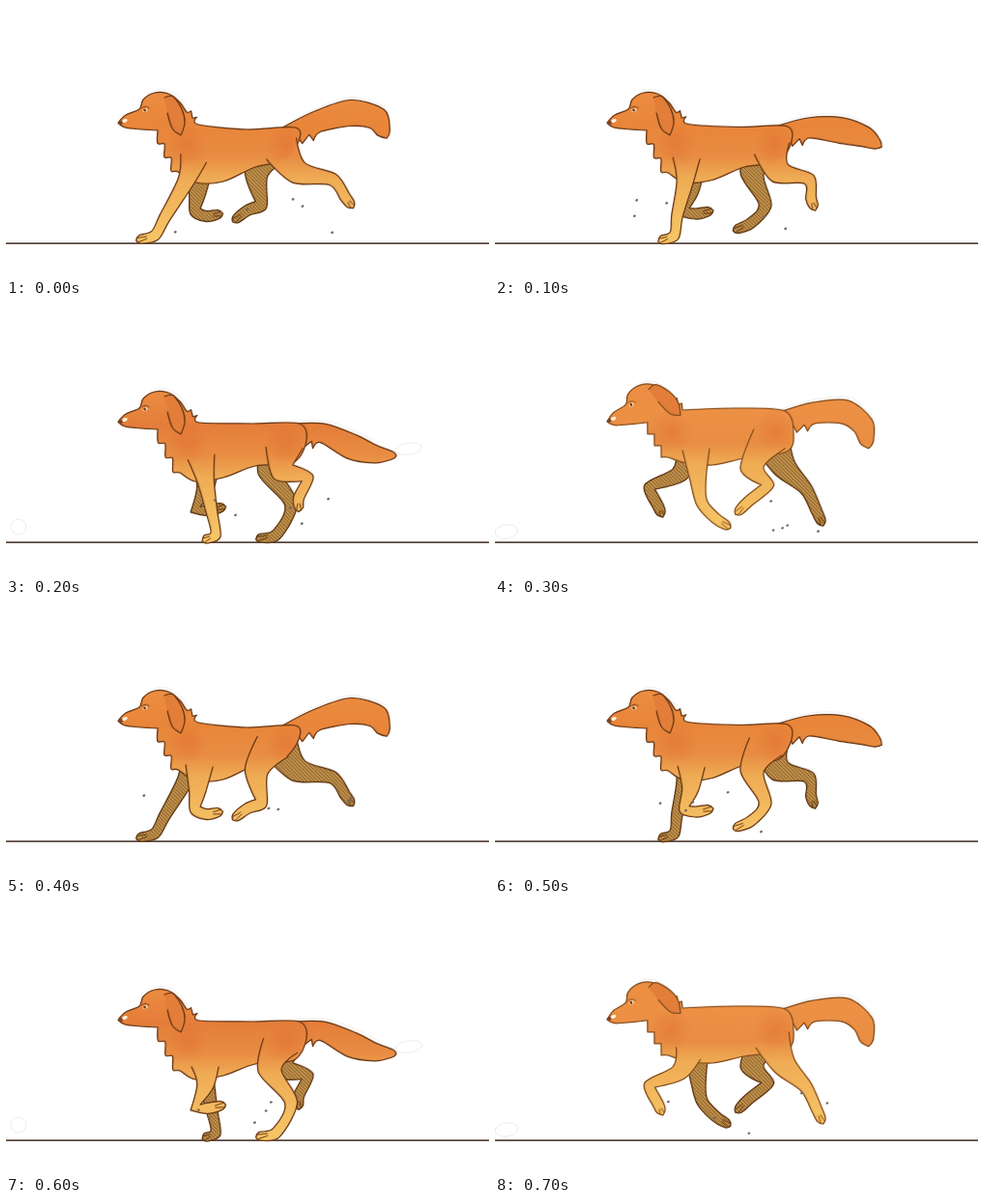
These frames come from a looping animation (500 px wide and 281 px high, 0.8 s). An HTML page with a canvas:

```html
<!DOCTYPE html>
<html lang="en">
<head>
<meta charset="utf-8">
<title>Running dog</title>
<style>
html, body { margin: 0; height: 100%; overflow: hidden; background: #fff }
canvas { display: block; width: 100vw; height: 100vh }
</style>
</head>
<body>
<canvas id="stage" width="500" height="281"></canvas>
<script>
const ctx = document.getElementById('stage').getContext('2d');
const STEP = 100, STEPS = 8;

// Half widths along each limb, root to tip.
const FRONT = [14, 8.5, 5.8, 5.5, 4.5], HIND = [19, 12, 6.5, 5.5, 4.5];

// The head is one shape, tilted about the nose; the ear also swings.
const NOSE = [116, 121], EAR_ROOT = [166, 95];
const HEAD = [NOSE, [124, 113], [138, 107], [142, 97], [154, 90], [168, 91], [180, 100], [187, 110]];
const JAW = [[157, 129], [140, 128], [123, 126]];
const EAR = [[164, 95], [173, 94], [182, 107], [185, 121], [181, 134], [172, 127], [167, 111]];

// Joints of three key poses; the torso runs from withers over rump to chest.
const contact = {
  torso: [[199, 123], [250, 128], [299, 126], [303, 140], [288, 160], [258, 167], [225, 182], [196, 183], [178, 172]],
  tail: [[288, 133], [322, 120], [357, 111], [384, 117], [391, 131]],
  tailWidth: [7, 11, 13.5, 12, 7],
  leadFront: [[194, 158], [186, 182], [164, 220], [154, 238], [139, 242]],
  tuckFront: [[200, 168], [198, 195], [196, 213], [207, 218], [220, 216]],
  leadHind: [[285, 148], [303, 173], [338, 180], [351, 198], [357, 206]],
  tuckHind: [[276, 148], [259, 174], [264, 206], [250, 212], [238, 221]],
  tilt: 0, swing: 0, top: '#e88539', ink: '#6c3916', marks: []
};
const passing = {
  torso: [[200, 122], [255, 123], [303, 123], [311, 140], [298, 163], [258, 167], [225, 179], [196, 183], [180, 174]],
  tail: [[298, 131], [328, 133], [358, 147], [383, 155], [400, 156]],
  tailWidth: [8, 10, 13, 9, 4],
  leadFront: [[202, 158], [207, 184], [213, 215], [217, 238], [207, 243]],
  tuckFront: [[206, 170], [206, 190], [196, 212], [208, 213], [223, 210]],
  leadHind: [[288, 148], [287, 173], [312, 180], [303, 200], [303, 210]],
  tuckHind: [[284, 148], [273, 174], [295, 207], [280, 238], [263, 242]],
  tilt: 0, swing: 0, top: '#e47d39', ink: '#6c3a18', marks: [[13, 230, 8, 8], [417, 149, 14, 6]]
};
const push = {
  torso: [[194, 109], [250, 107], [300, 110], [309, 133], [302, 152], [258, 159], [225, 166], [198, 164], [179, 158]],
  tail: [[296, 119], [330, 112], [362, 111], [381, 125], [385, 142]],
  tailWidth: [8, 11, 12.5, 11, 7],
  leadFront: [[208, 150], [210, 180], [214, 205], [228, 221], [240, 229]],
  tuckFront: [[200, 156], [190, 176], [160, 189], [169, 209], [172, 216]],
  leadHind: [[284, 139], [266, 169], [282, 187], [262, 204], [252, 214]],
  tuckHind: [[287, 142], [300, 169], [322, 191], [333, 214], [338, 225]],
  tilt: -.175, swing: -.3, top: '#ec9044', ink: '#87501f', marks: [[12, 235, 12, 7]]
};

const mix = (a, b, k = .5) => Array.isArray(a) ? a.map((v, i) => mix(v, b[i], k)) : a + (b - a) * k;
const down = { ...contact };
for (const key of ['torso', 'tail', 'tailWidth', 'leadFront', 'tuckFront', 'leadHind', 'tuckHind']) {
  down[key] = mix(contact[key], passing[key]);
}
const poses = [contact, down, passing, push];

const spin = (pts, [cx, cy], angle) => pts.map(([x, y]) => {
  const c = Math.cos(angle), s = Math.sin(angle);
  return [cx + (x - cx) * c - (y - cy) * s, cy + (x - cx) * s + (y - cy) * c];
});
const unit = (p, q) => {
  const d = Math.hypot(q[0] - p[0], q[1] - p[1]) || 1;
  return [(q[0] - p[0]) / d, (q[1] - p[1]) / d];
};

// Zigzag of n tufts from p to q.
function fluff(p, q, n, depth) {
  const [dx, dy] = unit(p, q), pts = [];
  for (let i = 0; i < n; i++) {
    const [x, y] = mix(p, q, (i + .25) / n);
    pts.push(mix(p, q, i / n), [x - dy * depth, y + dx * depth]);
  }
  return [...pts, q];
}

// Outline of a limb around its joints, open at the root.
function ribbon(joints, half, tufts) {
  const front = [], back = [], last = joints.length - 1;
  joints.forEach((p, i) => {
    const a = unit(joints[Math.max(0, i - 1)], p), b = unit(p, joints[Math.min(last, i + 1)]);
    const [dx, dy] = unit([0, 0], [a[0] + b[0], a[1] + b[1]]), w = half[i];
    front.push([p[0] - dy * w, p[1] + dx * w]);
    back.unshift([p[0] + dy * w, p[1] - dx * w]);
  });
  const dir = unit(joints[last - 1], joints[last]);
  const tip = joints[last].map((v, i) => v + dir[i] * half[last]);
  if (tufts) front.splice(0, 2, ...fluff(front[0], front[1], tufts, 7));
  return [...front, tip, ...back];
}

// Smooth curve through the points; sharp turns stay corners.
function curve(pts, closed) {
  const n = pts.length, path = new Path2D();
  const at = i => closed ? pts[(i + n) % n] : pts[Math.max(0, Math.min(n - 1, i))];
  const slope = i => {
    const a = at(i - 1), b = at(i), c = at(i + 1), u = unit(a, b), v = unit(b, c);
    const sharp = u[0] * v[0] + u[1] * v[1] < .1;
    return sharp ? [0, 0] : [(c[0] - a[0]) / 6.5, (c[1] - a[1]) / 6.5];
  };
  path.moveTo(...pts[0]);
  for (let i = 0; i < (closed ? n : n - 1); i++) {
    const p = at(i), q = at(i + 1), s = slope(i), e = slope(i + 1);
    path.bezierCurveTo(p[0] + s[0], p[1] + s[1], q[0] - e[0], q[1] - e[1], ...q);
  }
  if (closed) path.closePath();
  return path;
}

function ink(path, color, width = 1.2) {
  ctx.strokeStyle = color;
  ctx.lineWidth = width;
  ctx.stroke(path);
  ctx.save();
  ctx.globalAlpha = .35;
  ctx.translate(.9, -.7);
  ctx.lineWidth = .7;
  ctx.stroke(path);
  ctx.restore();
}

function shape(pts, fill, color, closed) {
  const path = curve(pts, closed);
  ctx.fillStyle = fill;
  ctx.fill(path);
  ink(path, color);
  return path;
}

function ghost(pts) {
  ctx.save();
  ctx.translate(2, -3);
  ctx.strokeStyle = '#eceae9';
  ctx.lineWidth = .8;
  ctx.stroke(curve(pts));
  ctx.restore();
}

function hatch(path) {
  ctx.save();
  ctx.clip(path);
  ctx.globalAlpha = .6;
  ctx.strokeStyle = '#5d3c14';
  ctx.lineWidth = .9;
  ctx.beginPath();
  for (let x = 40; x < 380; x += 3.8) {
    ctx.moveTo(x, 140);
    ctx.lineTo(x + 110, 250);
  }
  ctx.stroke();
  ctx.restore();
}

function leg(joints, half, fill, color, far) {
  const pts = ribbon(joints, half), path = shape(pts, fill, color);
  if (far) hatch(path);
  const n = joints.length, heel = joints[n - 2];
  for (const toe of [mix(pts[n - 1], pts[n], .5), mix(pts[n], pts[n + 1], .5)]) {
    ink(curve([toe, mix(toe, heel, .5)]), color, .9);
  }
}

function dot(x, y, rx, ry, fill) {
  ctx.fillStyle = fill;
  ctx.beginPath();
  ctx.ellipse(x, y, rx, ry, -.4, 0, 7);
  ctx.fill();
}

function glow([x, y], clip) {
  const g = ctx.createRadialGradient(x, y, 2, x, y, 22);
  g.addColorStop(0, 'rgba(222,100,45,.35)');
  g.addColorStop(1, 'rgba(222,100,45,0)');
  ctx.save();
  ctx.clip(clip);
  ctx.fillStyle = g;
  ctx.fillRect(x - 22, y - 22, 44, 44);
  ctx.restore();
}

function drawDust(step) {
  let seed = step * 77 + 19;
  const random = () => (seed = seed * 16807 % 2147483647) / 2147483647;
  random();
  for (let i = 0; i < 5; i++) dot(140 + 220 * random(), 195 + 44 * random(), 1.5, 1.2, '#75685f');
}

function draw(step) {
  const pose = poses[step % 4], color = pose.ink, torso = pose.torso;
  const [near, far] = step < 4 ? ['lead', 'tuck'] : ['tuck', 'lead'];
  const tilted = pts => spin(pts, NOSE, pose.tilt);
  const head = tilted(HEAD), jaw = tilted(JAW);
  const tail = ribbon(pose.tail, pose.tailWidth, 3);
  const [backX, backY] = torso[0];

  ctx.fillStyle = '#fff';
  ctx.fillRect(0, 0, 500, 281);
  ctx.lineJoin = ctx.lineCap = 'round';
  ctx.fillStyle = '#54423a';
  ctx.fillRect(0, 245.3, 500, 1.7);

  ghost(head.slice(3));
  ghost(tail.slice(-4));
  for (const [x, y, rx, ry] of pose.marks) {
    ctx.beginPath();
    ctx.ellipse(x, y, rx, ry, -.15, 0, 7);
    ctx.strokeStyle = '#e6e4e3';
    ctx.stroke();
  }

  const coat = ctx.createLinearGradient(0, backY - 35, 0, backY + 115);
  coat.addColorStop(0, '#ec8d42');
  coat.addColorStop(.25, pose.top);
  coat.addColorStop(.46, '#e88d42');
  coat.addColorStop(.61, '#efac55');
  coat.addColorStop(1, '#f5c465');

  leg(pose[far + 'Front'], FRONT, '#bd8d49', '#5e3815', true);
  leg(pose[far + 'Hind'], HIND, '#bd8d49', '#5e3815', true);

  shape(tail, coat, color);
  const body = shape([
    ...head.slice(0, -1), ...fluff(head[7], torso[0], 2, -4), ...torso.slice(1, -1),
    ...fluff(torso[8], jaw[0], 3, -6), ...jaw.slice(1)
  ], coat, color, true);
  leg(pose[near + 'Hind'], HIND, coat, color);
  leg(pose[near + 'Front'], FRONT, coat, color);
  glow([backX - 12, backY + 22], body);
  glow([290, backY + 22], body);

  shape(tilted(spin(EAR, EAR_ROOT, pose.swing)), '#e27e39', color);
  const [[ex, ey], [nx, ny]] = tilted([[144, 108], [123, 119]]);
  dot(ex, ey, 2.8, 2, '#f5cfa5');
  dot(ex - .4, ey, 1.3, 1.6, '#713b19');
  ink(curve([[ex - 4, ey - 2], [ex, ey - 3.6], [ex + 4, ey - 2]]), color, .7);
  dot(nx - 4, ny + 2, 3, 1.8, '#7b4425');
  dot(nx, ny, 2.9, 1.8, '#fff1df');

  drawDust(step);
}

let shown = -1;
function tick(now) {
  const step = Math.floor(now / STEP) % STEPS;
  if (step !== shown) draw(shown = step);
  requestAnimationFrame(tick);
}
draw(0);
requestAnimationFrame(tick);
</script>
</body>
</html>
```
